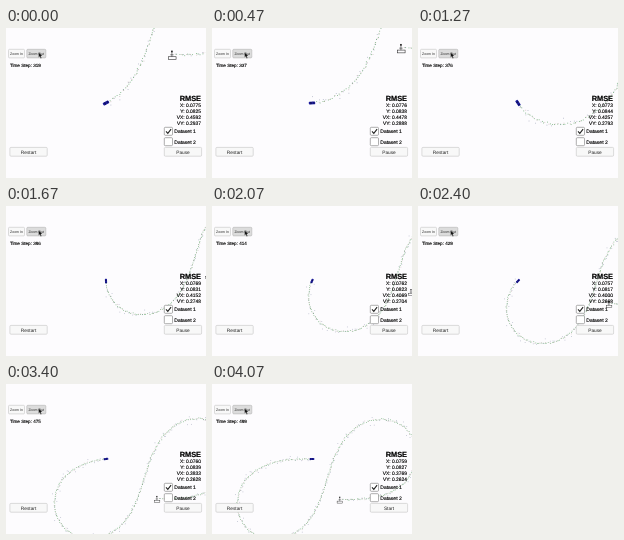
An HTML page with a canvas that plays this animation: 200 px wide and 150 px high, repeating every 4940 ms.

```html
<!DOCTYPE html>
<html lang="en">
<head>
<meta charset="utf-8">
<title>Tracking filter run</title>
<style>
html, body { margin: 0; width: 100%; height: 100%; overflow: hidden; background: #fdfcfe; }
canvas, svg { position: absolute; left: 0; top: 0; width: 100vw; height: 100vh; display: block; }
text { font-family: "Liberation Sans", Arial, sans-serif; fill: #000; text-rendering: geometricPrecision; }
.btn { fill: #f8f8f8; stroke: #c4c4c4; stroke-width: .6; }
.hover { fill: #dcdcdc; stroke: #b4b4b4; }
.box { fill: #fff; stroke: #777; stroke-width: .6; }
.mid { text-anchor: middle; font-size: 4.8px; fill: #222; }
.small { font-size: 3.5px; }
.val { text-anchor: end; font-size: 4.9px; }
.label { font-size: 5px; }
.val, .label, #step { stroke: #000; stroke-width: .14; }
</style>
</head>
<body>
<canvas id="world"></canvas>
<svg viewBox="0 0 200 150" preserveAspectRatio="none">
  <rect class="btn" x="2.5" y="21.3" width="16" height="8.6" rx="1"/>
  <text class="mid small" x="10.5" y="26.9">Zoom In</text>
  <rect class="btn hover" x="20.8" y="21.3" width="19" height="8.6" rx="1"/>
  <text class="mid small" x="30.2" y="26.9">Zoom Out</text>
  <path d="M32.6 24.2v5.2l1.2-1 .9 2 1-.5-.9-1.9h1.6z" fill="#111" stroke="#fff" stroke-width=".25"/>
  <text id="step" x="3.9" y="38.9" font-size="4.6"></text>

  <text x="195" y="73" font-size="7.4" font-weight="bold" text-anchor="end" stroke="#000" stroke-width=".2">RMSE</text>
  <text class="val" x="195" y="79"></text>
  <text class="val" x="195" y="85"></text>
  <text class="val" x="195" y="91"></text>
  <text class="val" x="195" y="97"></text>

  <rect class="box" x="158.3" y="99.3" width="8.2" height="8" rx="1"/>
  <path d="M160 103.4l1.8 1.9 3.3-4.2" fill="none" stroke="#222" stroke-width="1.1"/>
  <text class="label" x="168.3" y="105.2">Dataset 1</text>
  <rect class="box" x="158.3" y="109.7" width="8.2" height="8" rx="1"/>
  <text class="label" x="168.3" y="115.6">Dataset 2</text>

  <rect class="btn" x="3.9" y="119.4" width="37.3" height="8.8" rx="1"/>
  <text class="mid" x="22.5" y="125.6">Restart</text>
  <rect class="btn" x="158.3" y="119.4" width="37.3" height="8.8" rx="1"/>
  <text class="mid" id="run" x="177" y="125.6">Pause</text>
</svg>
<script>
const LOOP = 4940, TICK = 200 / 3, LAST = 60, DONE = 58;
const ZOOM_TICK = 20, NEAR = 1.39, FAR = 1;
const STEPS = 499, STRIDE = 0.965, SWING = 2.21;
const CX = 100, CY = 75;

// tick, time step, then the four errors
const KEYS = [
  [0, 319, .0775, .0825, .4592, .2937],
  [13, 359, .0777, .0854, .4344, .2830],
  [24, 396, .0769, .0831, .4152, .2748],
  [35, 429, .0757, .0817, .4000, .2668],
  [41, 447, .0751, .0831, .3926, .2674],
  [50, 475, .0760, .0839, .3833, .2628],
  [DONE, 499, .0759, .0827, .3769, .2624]
];
const NAMES = ['X', 'Y', 'VX', 'VY'];

const canvas = document.getElementById('world');
const ctx = canvas.getContext('2d');
const stepText = document.getElementById('step');
const runText = document.getElementById('run');
const values = document.querySelectorAll('.val');

let seed = 11;
const rand = () => (seed = (seed * 16807) % 2147483647) / 2147483647;
const noise = size => (rand() + rand() + rand() - 1.5) * size;

// Constant speed with a sinusoidal yaw rate gives the figure eight.
const heading = s => SWING * (1 - Math.cos(2 * Math.PI * s / STEPS));

// Laser and radar readings alternate; radar error grows with range.
function buildPath() {
  const path = [];
  let x = 2.2, y = -2.2;
  for (let s = 0; s <= STEPS; s++) {
    const spread = s % 2 ? 1 + .04 * Math.hypot(x, y) : 1.1;
    path.push({
      x, y,
      ex: x + noise(.7), ey: y + noise(.7),
      mx: x + noise(spread), my: y + noise(spread)
    });
    const a = heading(s + .5);
    x += STRIDE * Math.cos(a);
    y -= STRIDE * Math.sin(a);
  }
  return path;
}
const path = buildPath();

function stateAt(tick) {
  let i = 0;
  while (i < KEYS.length - 2 && tick >= KEYS[i + 1][0]) i++;
  const a = KEYS[i], b = KEYS[i + 1];
  const f = Math.min(1, (tick - a[0]) / (b[0] - a[0]));
  return a.map((v, n) => v + (b[n] - v) * f);
}

function dot(x, y, size, color) {
  ctx.fillStyle = color;
  ctx.fillRect(x - size / 2, y - size / 2, size, size);
}

function drawTrail(step, k) {
  const size = (.6 + .2 * k) / k;
  for (let s = 0; s <= step; s++) {
    const p = path[s];
    if (s % 4 < 2) dot(p.mx, p.my, size, s % 2 ? 'rgba(70,80,120,.4)' : 'rgba(140,90,90,.35)');
    if (s % 2) dot(p.ex, p.ey, size, 'rgba(50,140,60,.65)');
  }
}

// Sensor post at the world's origin
function drawSensor() {
  ctx.strokeStyle = '#222';
  ctx.lineWidth = .4;
  ctx.strokeRect(-2.8, -.6, 5.6, 2);
  ctx.beginPath();
  ctx.moveTo(-.2, -.6);
  ctx.lineTo(-.2, -4.4);
  ctx.moveTo(-1.4, -2);
  ctx.lineTo(1, -2);
  ctx.stroke();
  dot(-.2, -4.4, 1.2, '#222');
}

function drawCar(p, angle) {
  ctx.save();
  ctx.translate(p.x, p.y);
  ctx.rotate(-angle);
  ctx.fillStyle = '#1c1c9c';
  ctx.beginPath();
  ctx.roundRect(-2.3, -1.05, 4.6, 2.1, .6);
  ctx.fill();
  ctx.fillStyle = '#0a0a40';
  ctx.fillRect(.4, -.75, .7, 1.5);
  ctx.fillRect(-1.6, -.7, .5, 1.4);
  ctx.restore();
}

function draw(tick) {
  const [, at, ...errors] = stateAt(tick);
  const step = Math.round(at);
  const car = path[step];
  const k = tick < ZOOM_TICK ? NEAR : FAR;
  const dpr = window.devicePixelRatio || 1;
  const w = Math.round(innerWidth * dpr), h = Math.round(innerHeight * dpr);
  if (canvas.width !== w || canvas.height !== h) {
    canvas.width = w;
    canvas.height = h;
  }

  ctx.setTransform(w / 200, 0, 0, h / 150, 0, 0);
  ctx.fillStyle = '#fdfcfe';
  ctx.fillRect(0, 0, 200, 150);
  ctx.translate(CX, CY);
  ctx.scale(k, k);
  ctx.translate(-car.x, -car.y);
  drawTrail(step, k);
  drawSensor();
  drawCar(car, heading(step));

  stepText.textContent = 'Time Step: ' + step;
  values.forEach((el, i) => { el.textContent = NAMES[i] + ': ' + errors[i].toFixed(4); });
  runText.textContent = tick < DONE ? 'Pause' : 'Start';
}

const start = performance.now();
function frame() {
  const t = (performance.now() - start) % LOOP;
  draw(Math.min(LAST, Math.max(0, Math.floor(t / TICK + .1) - 1)));
  requestAnimationFrame(frame);
}
frame();
</script>
</body>
</html>
```
